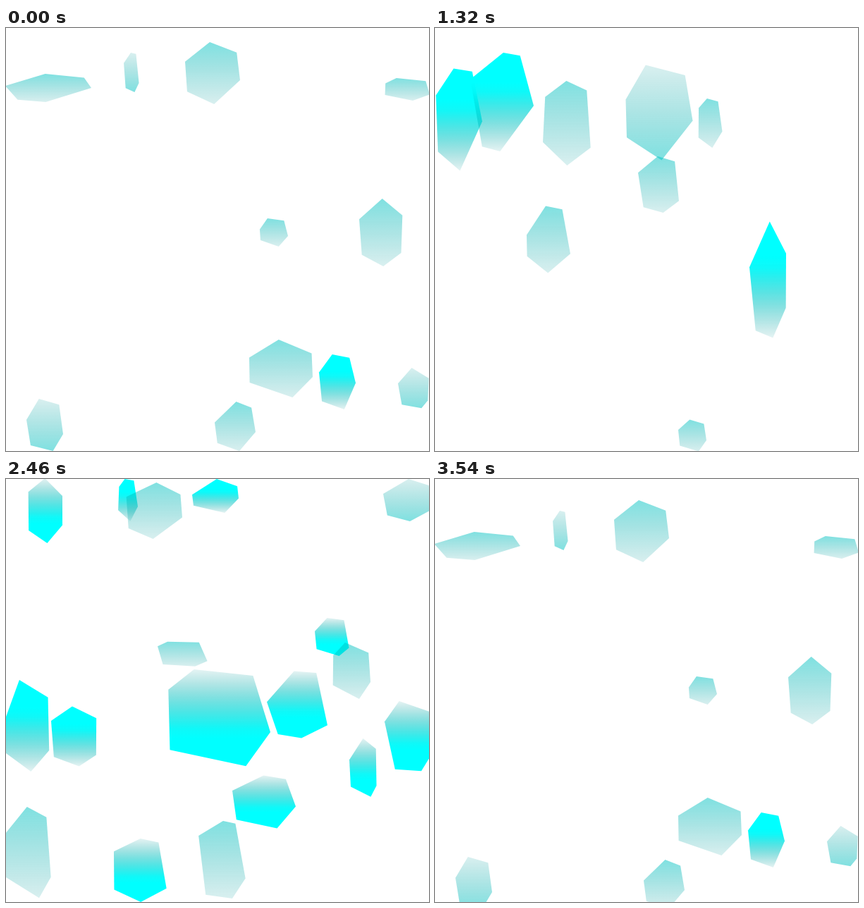
Animation of 600 by 600 pixels, one loop 3600 ms. Source, as an HTML page with a canvas:

```html
<!DOCTYPE html>
<html>
<head>
<meta charset="utf-8">
<style>
  html, body { margin: 0; width: 100%; height: 100%; overflow: hidden; background: #fff; }
  canvas { display: block; }
</style>
</head>
<body>
<canvas width="600" height="600"></canvas>
<script>
const LOOP = 3600, STEP = 60, DRIFT = 0.07;
const ctx = document.querySelector('canvas').getContext('2d');
const poses = [];
let seed = 7;

function random() {
  seed = seed * 16807 % 2147483647;
  return seed / 2147483647;
}

const clamp = (v, lo, hi) => Math.min(hi, Math.max(lo, v));

// An irregular six-sided shard filling its box.
// A negative height puts the dark end at the bottom.
function shard(x, y, w, h, dark, light) {
  const shape = new Path2D();
  for (let i = 0; i < 6; i++) {
    const angle = (i + random() * 0.6) * Math.PI / 3;
    shape.lineTo(x + clamp(Math.cos(angle) * 1.1, -1, 1) * w / 2,
                 y + clamp(Math.sin(angle) * 1.1, -1, 1) * Math.abs(h) / 2);
  }
  shape.closePath();
  poses.at(-1).shards.push({ shape, from: y - h / 2, to: y + h / 2, dark, light });
}

const pose = time => poses.push({ time, shards: [], offset: 0 });
const solid = (x, y, w, h) => shard(x, y, w, h, 1.5, 0.1);
const pale = (x, y, w, h) => shard(x, y, w, h, 0.5, 0.15);

pose(0);
pale(60, 85, 122, 40);
pale(293, 64, 78, 88);
pale(178, 63, 22, -56);
pale(569, 87, 64, 32);
pale(532, 290, 62, 96);
pale(380, 290, 40, 40);
pale(390, 483, 90, 82);
solid(470, 502, 52, 78);
pale(578, 511, 44, -58);
pale(55, 563, 52, -74);
pale(325, 565, 58, 70);

pose(600);
solid(124, 332, 68, -104);
pale(28, 455, 58, 70);
pale(56, 412, 64, -40);
pale(112, 444, 90, 66);
solid(185, 428, 66, -88);
pale(300, 445, 110, -80);
solid(220, 515, 95, -100);
solid(80, 535, 95, -92);
pale(415, 430, 135, 40);
pale(467, 480, 36, 100);
pale(442, 370, 52, 44);

pose(1320);
solid(34, 130, 66, 145);
solid(95, 105, 90, 140);
pale(188, 135, 70, 120);
pale(318, 120, 95, -135);
pale(318, 222, 60, 80);
solid(472, 357, 52, 165);
pale(161, 300, 62, 95);
pale(390, 135, 35, 70);
pale(365, 578, 40, 45);

pose(1980);
solid(213, 30, 85, -70);
pale(140, 38, 70, 50);
solid(135, 148, 30, 58);
pale(168, 280, 88, -62);
solid(55, 350, 62, 140);
solid(290, 385, 165, -95);
solid(404, 412, 66, -100);
pale(245, 545, 100, -90);
solid(582, 460, 42, -125);
solid(125, 550, 40, 80);
solid(143, 495, 42, -52);
solid(35, 555, 80, 85);
solid(565, 545, 80, 55);
pale(325, 480, 56, 70);

pose(2460);
solid(55, 45, 50, -92);
solid(173, 30, 28, 60);
pale(210, 45, 80, 80);
solid(297, 24, 66, 48);
pale(570, 30, 70, -60);
solid(463, 224, 50, -54);
pale(490, 272, 54, 80);
pale(250, 248, 76, 36);
solid(300, 340, 150, -140);
solid(415, 320, 90, -95);
solid(30, 350, 65, 130);
solid(97, 365, 68, 85);
solid(572, 365, 70, -100);
solid(366, 458, 90, -75);
solid(507, 410, 40, -84);
pale(30, 530, 70, 130);
solid(190, 555, 80, -90);
pale(305, 540, 70, 110);

pose(3180);
solid(163, 52, 26, 85);
solid(275, 347, 70, -113);
solid(478, 445, 60, -175);
pale(550, 333, 54, -80);
pale(578, 440, 44, 62);
pale(328, 490, 92, 110);
pale(125, 530, 44, 90);
pale(220, 497, 56, -70);
pale(306, 568, 66, 45);
pale(506, 265, 30, 42);

// The last step shows the opening shards just before they settle.
poses.push({ time: LOOP - STEP, shards: poses[0].shards, offset: 10 });

function tint(level) {
  const l = clamp(level, 0, 1);
  const g = Math.round(255 - 120 * (1 - l));
  return `rgba(0,${g},${g},${l})`;
}

// Wear lowers every level, so the pale end of a shard dissolves first.
function drawPose({ shards, offset }, wear, shift) {
  ctx.save();
  ctx.translate(0, offset + shift);
  for (const { shape, from, to, dark, light } of shards) {
    const fill = ctx.createLinearGradient(0, from, 0, to);
    for (let i = 0; i <= 10; i++) {
      fill.addColorStop(i / 10, tint(dark + (light - dark) * i / 10 - wear));
    }
    ctx.fillStyle = fill;
    ctx.fill(shape);
  }
  ctx.restore();
}

function draw(now) {
  const t = Math.floor(now % LOOP / STEP) * STEP;
  const i = poses.findLastIndex(p => p.time <= t);
  const from = poses[i], to = poses[(i + 1) % poses.length];
  const span = (to.time || LOOP) - from.time;
  const u = (t - from.time) / span;
  ctx.clearRect(0, 0, 600, 600);
  if (u < 0.65) drawPose(from, u * 1.5, -u * span * DRIFT);
  if (u > 0.35) drawPose(to, (1 - u) * 1.5, (1 - u) * span * DRIFT);
}

const start = performance.now();
function tick() {
  draw(performance.now() - start);
  requestAnimationFrame(tick);
}
tick();
</script>
</body>
</html>
```
